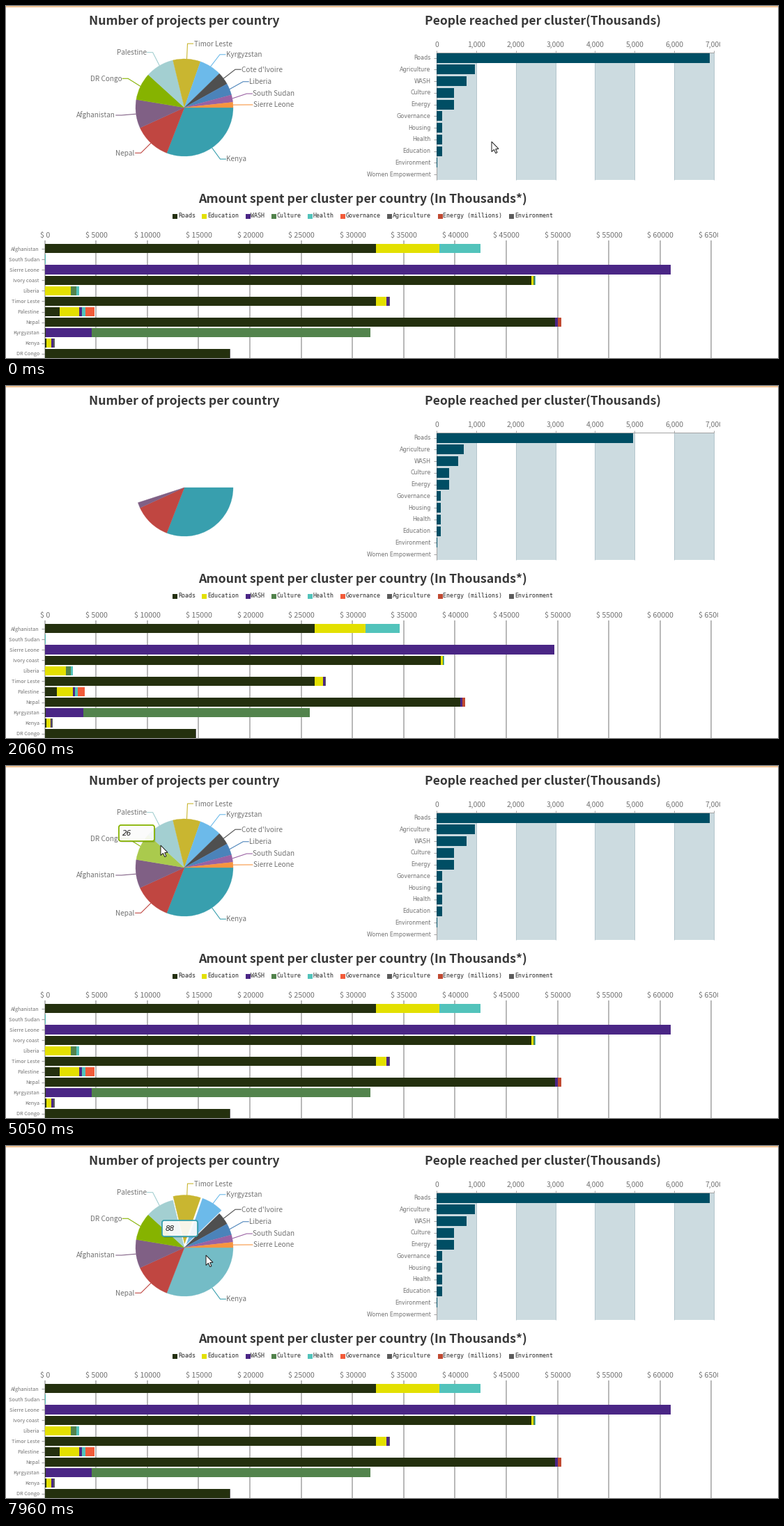
Write a matplotlib script that moves like this. It is 1108x506 px and loops after 8000 ms.

```python
import numpy as np
import matplotlib.pyplot as plt
from matplotlib.animation import FuncAnimation
from matplotlib.colors import to_rgb
from matplotlib.patches import FancyBboxPatch, Polygon, Rectangle, Wedge
from matplotlib.transforms import TransformedBbox, Bbox

W, H, DPI = 1108, 506, 64
STEP, LOOP = 50, 8000
SANS, WIDE, MONO = "Noto Sans CJK JP", "DejaVu Sans", "DejaVu Sans Mono"
GREY, DARK, AXIS = "#747474", "#383838", "#a3a3a3"

fig = plt.figure(figsize=(W / DPI, H / DPI), dpi=DPI, facecolor="white")
ax = fig.add_axes([0, 0, 1, 1])
ax.set(xlim=(0, W), ylim=(H, 0))
ax.axis("off")


def pt(px):
    return px * 72 / DPI


def text(x, y, s, px, color=GREY, font=SANS, ha="left", clip=None, **kw):
    label = ax.text(x, y, s, fontsize=pt(px), color=color, family=font, ha=ha,
                    va="baseline", parse_math=False, **kw)
    if clip:
        label.set_clip_box(TransformedBbox(Bbox([[0, 0], [clip, H]]), ax.transData))
        label.set_clip_on(True)
    return label


def line(xs, ys, color=AXIS, lw=1.0, z=1):
    return ax.plot(xs, ys, color=color, lw=pt(lw), zorder=z,
                   solid_capstyle="butt")[0]


def rect(x, y, w, h, color, z=2):
    return ax.add_patch(Rectangle((x, y), w, h, fc=color, lw=0, zorder=z))


rect(0, 0, W, 1.8, "#f2c597")

# ---- pie: projects per country -------------------------------------------
CX, CY, R = 256, 146, 70
# name, projects, colour, nudge of the label
SLICES = [("Kenya", 88, "#389fae", (0, 0)), ("Nepal", 35, "#c04641", (0, 0)),
          ("Afghanistan", 27, "#806085", (0, 0)),
          ("DR Congo", 26, "#86b300", (1, -1)),
          ("Palestine", 27, "#a3cfd1", (1, 0)),
          ("Timor Leste", 26, "#c9b630", (0, 0)),
          ("Kyrgyzstan", 21, "#6cbaea", (2, 1.5)),
          ("Cote d'Ivoire", 12, "#4f4f4f", (0, 0.5)),
          ("Liberia", 11, "#4b83ba", (0, -2)),
          ("South Sudan", 7, "#9a62a3", (0, -2)),
          ("Sierre Leone", 5, "#f8953f", (-1, 2))]
NAMES = [s[0] for s in SLICES]
COLORS = [s[2] for s in SLICES]
EDGES = np.concatenate([[0], np.cumsum([s[1] for s in SLICES])])
EDGES = EDGES * 360 / EDGES[-1]
MIDS = np.radians((EDGES[:-1] + EDGES[1:]) / 2)
LIGHT = [tuple(0.7 * c + 0.3 for c in to_rgb(col)) for col in COLORS]

pie_title = text(119, 27.3, "Number of projects per country", 17.7, DARK,
                 weight="bold")
wedges, pie_labels = [], []
for (name, _, color, (dx, dy)), a in zip(SLICES, MIDS):
    wedge = ax.add_patch(Wedge((CX, CY), R, 0, 1, fc=color, ec=color,
                               lw=pt(0.3), zorder=3))
    wedges.append(wedge)
    c, s = np.cos(a), np.sin(a)
    side = 1 if c > 0 else -1
    ex, ey = CX + 91 * c + dx, CY - 1 + 91 * s + dy
    pie_labels.append(line([CX + R * c, ex, ex + 8.5 * side],
                           [CY + R * s, ey, ey], color, 1.1))
    pie_labels.append(text(ex + 9 * side, ey + 3.4, name, 10,
                           ha="left" if side > 0 else "right"))

# ---- people reached per cluster ------------------------------------------
X0, UNIT, TOP, BOTTOM = 618, 56.86, 67, 250
REACH = [("Roads", 6900), ("Agriculture", 967), ("WASH", 756),
         ("Culture", 440), ("Energy", 440), ("Governance", 145),
         ("Housing", 145), ("Health", 145), ("Education", 145),
         ("Environment", 18), ("Women Empowerment", 0)]

top_chart = [text(601, 27.3, "People reached per cluster(Thousands)", 17.5,
                  DARK, weight="bold")]
for k in range(8):
    x = X0 + k * UNIT
    if k % 2 == 0:
        top_chart.append(rect(x, TOP, UNIT, BOTTOM - TOP, "#ccdbe0", 0))
    top_chart.append(line([x, x], [TOP, BOTTOM], "#b4c5cc", 1, 1))
    top_chart.append(line([x, x], [TOP - 3, TOP], AXIS, 1))
    top_chart.append(text(x, 58.6, f"{k * 1000:,}", 10.4, ha="center", clip=1024.5))
top_chart.append(line([X0, X0 + 7 * UNIT], [TOP - 0.5] * 2, AXIS, 1))
top_chart.append(line([X0 - 0.5] * 2, [TOP - 1, BOTTOM], AXIS, 1))

reach_bars = []
for i, (name, value) in enumerate(REACH):
    y = 74.5 + 16.75 * i
    top_chart.append(line([X0 - 4, X0], [y, y]))
    top_chart.append(text(609.5, y + 2.7, name, 7.95, font=WIDE, ha="right"))
    bar = rect(X0, y - 6.8, 0, 14, "#004e64")
    reach_bars.append((bar, value / 1000 * UNIT))
    top_chart.append(bar)

# ---- amount spent per cluster per country --------------------------------
CLUSTERS = {"Roads": "#24300e", "Education": "#e3e000", "WASH": "#4a2685",
            "Culture": "#52834c", "Health": "#52c3bb", "Governance": "#f25c3a",
            "Agriculture": "#5c5c5c", "Energy (millions)": "#c04a32",
            "Environment": "#5c5c5c"}
KEY = dict(zip("REWCHGANV", CLUSTERS.values()))
SPENT = [("Afghanistan", "R 32.27 E 6.15 H 4.05"), ("South Sudan", "H .1"),
         ("Sierre Leone", "W 61"), ("Ivory coast", "R 47.45 E .2 C .1 H .08"),
         ("Liberia", "E 2.48 C .58 H .3"),
         ("Timor Leste", "R 32.27 E 1.02 W .24 A .1"),
         ("Palestine", "R 1.46 E 1.87 W .24 H .37 G .85"),
         ("Nepal", "R 49.73 W .27 N .32"), ("Kyrgyzstan", "R .08 W 4.5 C 27.15"),
         ("Kenya", "R .14 E .5 W .15 A .16"), ("DR Congo", "R 18 A .1")]
SX, KILO = 56, 14.72

text(276, 283, "Amount spent per cluster per country (In Thousands*)", 17.8,
     DARK, weight="bold")
x = 239.3
for name, color in CLUSTERS.items():
    rect(x, 299, 7, 7, color)
    text(x + 7.8, 304.3, name, 8.4, "#2a2a2a", MONO)
    x += 5.06 * len(name) + 16.75

for k in range(14):
    x = SX + k * 5 * KILO
    line([x - 0.4] * 2, [337, H], AXIS, 1.5)
    text(x, 333, f"$ {k * 5000}", 10.7, ha="center", clip=1021.5)

spent_bars = []
for i, (name, parts) in enumerate(SPENT):
    y = 348.9 + 15.1 * i
    line([SX - 5, SX], [y, y], lw=1.2)
    text(48, y + 2.6, name, 7.4, ha="right")
    parts, start = parts.split(), 0
    for key, value in zip(parts[::2], parts[1::2]):
        width = float(value) * KILO
        spent_bars.append((rect(SX, y - 6.6, 0, 13.2, KEY[key]), start, width))
        start += width

# ---- pointer and tooltip --------------------------------------------------
ARROW = np.array([(0, 0), (0, 14.5), (3.4, 11.4), (5.8, 16.6), (8, 15.6),
                  (5.7, 10.6), (10, 10.3)])
arrow = ax.add_patch(Polygon(ARROW, closed=True, fc="white", ec="#1c1c1c",
                             lw=pt(1), zorder=12))
PATH = np.array([
    (0, 697, 195), (69, 697, 195), (70, 365, 10), (205, 365, 10),
    (280, 320, 6), (350, 270, 2), (430, 203, -6), (500, 200, -25),
    (2700, 76, -25), (2850, 66, 28), (2980, 70, 66), (3050, 72, 75),
    (3080, 72, 75), (3450, 125, 128), (3830, 194, 195), (3900, 208, 194),
    (4300, 222, 185), (4640, 226, 168), (4850, 219, 138), (4970, 222, 114),
    (5060, 222, 114), (5200, 232, 106), (5350, 248, 98), (5500, 258, 95),
    (5720, 239, 95), (5900, 250, 90), (6020, 263, 83), (6110, 263, 87),
    (6320, 268, 88), (6600, 267, 88), (6850, 278, 95), (7030, 284, 100),
    (7500, 284, 100), (7700, 283, 108), (7880, 284, 136), (7960, 287, 157)]).T
HOVER = [(3900, "Nepal"), (4720, "Afghanistan"), (4850, "DR Congo"),
         (5130, "Palestine"), (5350, "Timor Leste"), (5600, "Palestine"),
         (5850, "Timor Leste"), (6850, "Kyrgyzstan"), (7900, "Kenya")]
PULLED = [(6500, "Timor Leste"), (7300, "Kyrgyzstan")]


def round_box(z, **kw):
    return ax.add_patch(FancyBboxPatch(
        (0, 0), 51, 23, boxstyle="round,pad=0,rounding_size=3", zorder=z, **kw))


shade = round_box(8, fc="#000000", alpha=0.12, lw=0)
box = round_box(9, fc=(1, 1, 1, 0.9), lw=pt(1.8))
value_text = text(0, 0, "", 10.5, "#1a1a1a", WIDE, style="italic", zorder=10)
tooltip = [shade, box, value_text]


def pointer(t):
    return np.array([np.interp(t, PATH[0], PATH[1]),
                     np.interp(t, PATH[0], PATH[2])])


def show(artists, on):
    for a in artists:
        a.set_visible(bool(on))


def grow(t, start):
    u = np.clip((t - start) / 1000, 0, 1)
    return 1 - (1 - u) ** 3


def draw(n):
    t = n * STEP + 10 if n else 0
    loaded = t < 1450

    show([pie_title], loaded or t >= 1600)
    show(top_chart, loaded or t >= 1650)
    show(pie_labels, loaded or t >= 2620)

    reach = 1 if loaded else grow(t, 1716)
    for bar, width in reach_bars:
        bar.set_width(width * reach)
    spent = 1 if loaded else grow(t, 1631)
    for bar, start, width in spent_bars:
        bar.set_x(SX + start * spent)
        bar.set_width(width * spent)

    sweep = 360 if loaded else 360 * np.clip((t - 1610) / 1000, 0, 1)
    hovered = next((name for at, name in reversed(HOVER) if t >= at), None)
    pulled = [name for at, name in PULLED if t >= at]
    for i, wedge in enumerate(wedges):
        wedge.set_visible(bool(sweep > EDGES[i]))
        wedge.set_theta1(EDGES[i])
        wedge.set_theta2(max(min(EDGES[i + 1], sweep), EDGES[i] + 0.01))
        shift = 5.5 if NAMES[i] in pulled else 0
        wedge.set_center((CX + shift * np.cos(MIDS[i]),
                          CY + shift * np.sin(MIDS[i])))
        color = LIGHT[i] if NAMES[i] == hovered else COLORS[i]
        wedge.set(fc=color, ec=color)

    arrow.set_xy(ARROW + pointer(t))
    arrow.set_visible(not 500 <= t < 2700)

    show(tooltip, hovered)
    if hovered:
        i = NAMES.index(hovered)
        # the box trails the pointer a little
        bx, by = pointer(max(t - 80, 3900)) + (-60, -29)
        box.set_x(bx)
        box.set_y(by)
        box.set_edgecolor(COLORS[i])
        shade.set_x(bx + 1.5)
        shade.set_y(by + 2)
        value_text.set_position((bx + 4.5, by + 15.3))
        value_text.set_text(str(SLICES[i][1]))
    return []


anim = FuncAnimation(fig, draw, frames=LOOP // STEP, interval=STEP,
                     init_func=lambda: draw(0), repeat=True, repeat_delay=0)
plt.show()
```
